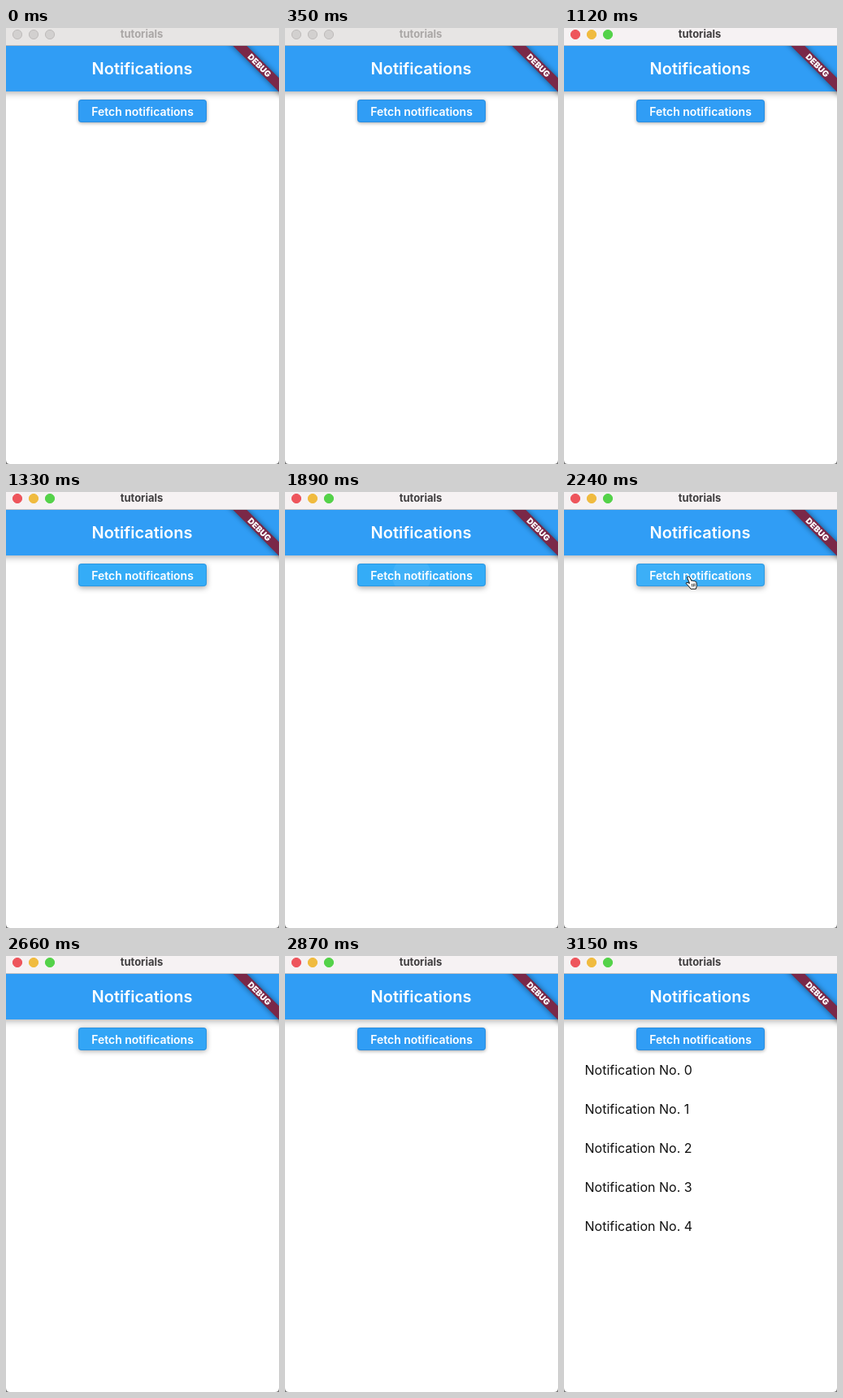
An HTML page for the animation above (4340 ms loop, 336 px wide and 536 px high).

```html
<!DOCTYPE html>
<html lang="en">
<head>
<meta charset="utf-8">
<title>Notifications</title>
<style>
  html, body { margin: 0; width: 100%; height: 100%; overflow: hidden; background: #fff; }
  svg { display: block; width: 336px; height: 536px; font-family: Inter, Roboto, sans-serif; }
  .label { fill: #fff; font-weight: 600; text-anchor: middle; }
  #bar { fill: #309df5; filter: drop-shadow(0 2px 4px rgba(0,0,0,.32)); }
  #caption { font-size: 13px; font-weight: 700; text-anchor: middle; }
  #list { font-size: 16px; fill: #111; }
  #ribbon text { font-size: 10.2px; font-weight: 900; }
</style>
</head>
<body>
<svg viewBox="0 0 336 536">
  <defs>
    <clipPath id="buttonClip"><rect x="89" y="88" width="158" height="28" rx="4"/></clipPath>
    <clipPath id="contentClip"><rect y="22" width="336" height="514"/></clipPath>
    <filter id="soft" x="-30%" y="-100%" width="160%" height="300%"><feGaussianBlur stdDeviation="3.5"/></filter>
  </defs>
  <rect width="336" height="536" fill="#fff"/>
  <g clip-path="url(#contentClip)">
    <rect id="bar" x="-10" y="10" width="356" height="68"/>
    <text class="label" x="167.5" y="57" font-size="20">Notifications</text>
    <rect id="button" x="89" y="88" width="158" height="28" rx="4"/>
    <circle id="splash" cx="156" cy="103" fill="#fff" clip-path="url(#buttonClip)"/>
    <rect x="89.5" y="88.5" width="157" height="27" rx="3.5" fill="none" stroke="#1b6cae" stroke-opacity=".3"/>
    <text class="label" x="168" y="108" font-size="14">Fetch notifications</text>
    <g id="list"></g>
    <g id="ribbon" transform="translate(336 22) rotate(45)">
      <rect x="-60" y="28" width="120" height="12" fill="#000" opacity=".5" filter="url(#soft)"/>
      <rect x="-60" y="28" width="120" height="12" fill="#7a2848"/>
      <text class="label" y="37.7">DEBUG</text>
    </g>
  </g>
  <rect id="titleBar" width="336" height="22"/>
  <rect y="21" width="336" height="1" fill="#000" opacity=".2"/>
  <g id="lights"></g>
  <text id="caption" x="167" y="12">tutorials</text>
  <g id="cursor" transform="translate(-1.3 0)" fill="#fff" stroke="#111" stroke-linejoin="round" stroke-linecap="round">
    <path d="M153 104.5q1.4-1.8 3 .2l2.3 4.6q1.4-1.1 2.2.2q1.5-.8 2.1.6q1.5-.3 1.7 1.2l.4 4-1 3.9h-6.3l-3.4-4.3-2.5-2.2q0-1.8 1.8-1.5l2.2 1z"/>
    <path d="M158.7 113.2l.4 3m1.5-3.2l.3 3m1.4-3.2l.2 2.8" stroke-width=".8"/>
  </g>
  <path d="M0 531v5h5q-5 0-5-5zM336 531v5h-5q5 0 5-5z" fill="#777"/>
</svg>
<script>
const LOOP = 4340, STEP = 70;
const el = id => document.getElementById(id);
const clamp = v => Math.max(0, Math.min(1, v));
const ramp = (t, from, to) => clamp((t - from) / (to - from));
const mix = (a, b, k) => `rgb(${a.map((v, i) => Math.round(v + (b[i] - v) * k))})`;

const BLUE = [48, 157, 245], HOVER = [52, 172, 247];
const LIGHTS = ['#ee555c', '#f0bb3f', '#54d249'];

function add(parent, tag, attrs, text = '') {
  const node = document.createElementNS('http://www.w3.org/2000/svg', tag);
  for (const key in attrs) node.setAttribute(key, attrs[key]);
  node.textContent = text;
  return el(parent).appendChild(node);
}

const lights = LIGHTS.map((_, i) => add('lights', 'circle', { cx: 14 + 20 * i, cy: 8, r: 5.6 }));
for (let i = 0; i < 5; i++) add('list', 'text', { x: 25.5, y: 146 + 48 * i }, `Notification No. ${i}`);

function show(id, visible) {
  el(id).setAttribute('visibility', visible ? 'visible' : 'hidden');
}

function render(t) {
  const active = t >= 1120;
  el('titleBar').setAttribute('fill', active ? '#f6f2f3' : '#e7e5e4');
  el('caption').setAttribute('fill', active ? '#413f40' : '#aaa7a6');
  lights.forEach((light, i) => {
    light.setAttribute('fill', active ? LIGHTS[i] : '#d2d0cf');
    light.setAttribute('stroke', active ? LIGHTS[i] : '#bfbcbb');
  });

  // Hover tint is quick; the button's shadow follows more slowly.
  const hover = ramp(t, 1120, 1190) - ramp(t, 2590, 2730);
  const lift = ramp(t, 1120, 1330) - ramp(t, 2590, 2870);
  const button = el('button');
  button.setAttribute('fill', mix(BLUE, HOVER, hover));
  button.style.filter = `drop-shadow(0 ${1 + lift}px ${2 + 1.5 * lift}px rgba(0,0,0,.34))`;

  const press = ramp(t, 1890, 2170);
  const release = ramp(t, 2170, 2310);
  el('splash').setAttribute('r', 24 + 76 * press);
  el('splash').setAttribute('opacity', (0.07 + 0.09 * press) * (1 - release) ** 2);
  show('splash', t >= 1890 && t < 2310);
  show('cursor', t >= 2240 && t < 2310);
  show('list', t >= 3080);
}

const start = performance.now();
function tick() {
  const t = (performance.now() - start) % LOOP;
  render(Math.floor(t / STEP) * STEP);
  requestAnimationFrame(tick);
}
render(0);
requestAnimationFrame(tick);
</script>
</body>
</html>
```
